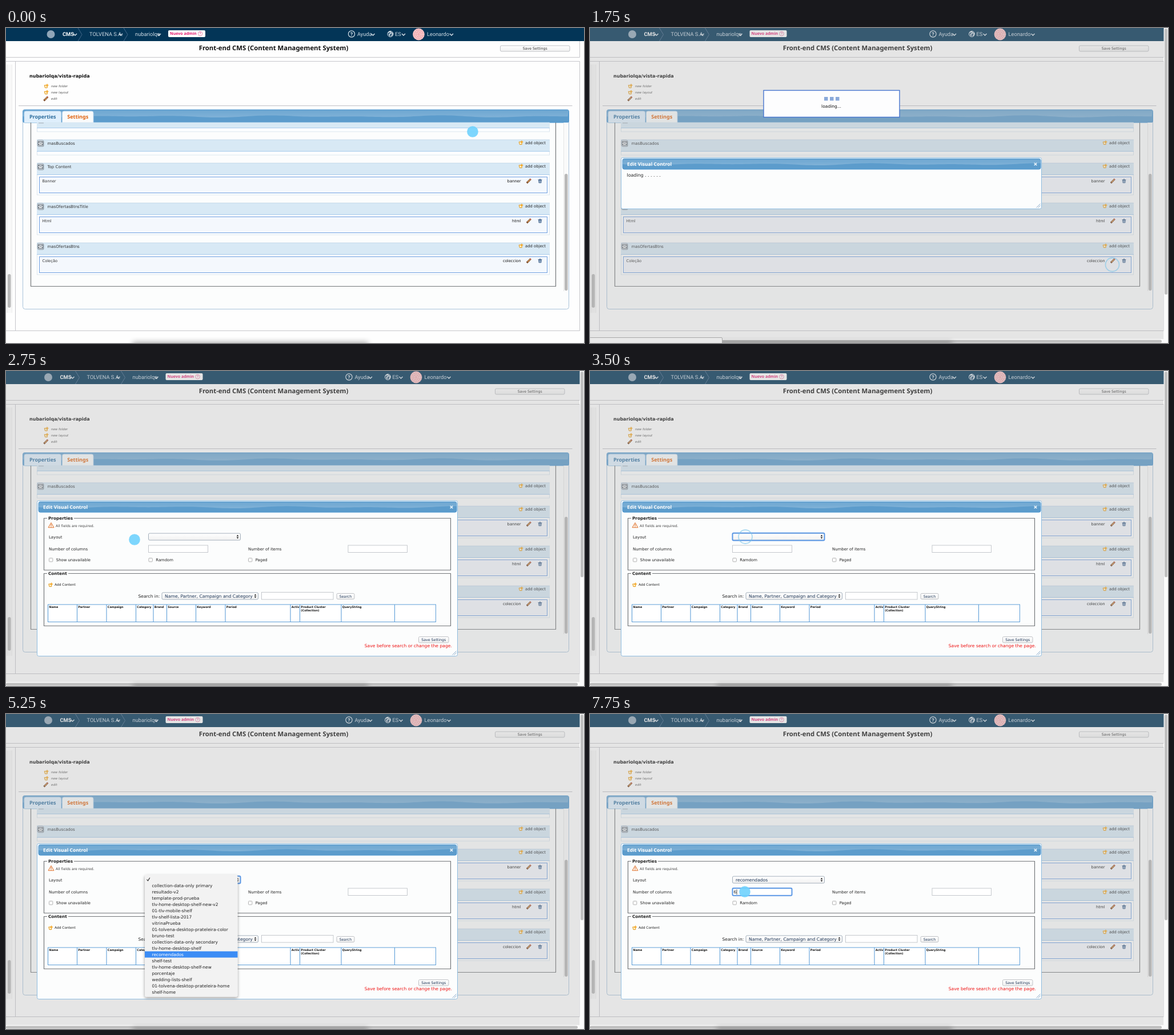
An HTML page for the animation above (8 s loop, 1012 by 553 pixels).

```html
<!DOCTYPE html>
<html lang="es">
<head>
<meta charset="utf-8">
<title>Front-end CMS</title>
<style>
  html, body { margin: 0; width: 100%; height: 100%; overflow: hidden; background: #fefefe; }
  svg { display: block; width: 1012px; height: 553px; font-family: 'DejaVu Sans', Verdana, sans-serif; text-rendering: geometricPrecision; }
  text { white-space: pre; }
  .ui { font-family: 'Noto Sans', sans-serif; font-weight: 700; }
  .bar { font-family: Roboto, sans-serif; font-stretch: 75%; }
  .b { font-weight: 700; }
  .i { font-style: italic; }
</style>
</head>
<body>
<svg id="stage" viewBox="0 0 1012 553">
  <defs>
    <linearGradient id="gloss" x1="0" y1="0" x2="0" y2="1">
      <stop offset="0" stop-color="#fff" stop-opacity=".1"/>
      <stop offset="1" stop-color="#fff" stop-opacity=".22"/>
    </linearGradient>
    <linearGradient id="btn" x1="0" y1="0" x2="0" y2="1">
      <stop offset="0" stop-color="#fff"/>
      <stop offset="1" stop-color="#f1f1f1"/>
    </linearGradient>
    <filter id="soft" x="-10%" y="-200%" width="120%" height="500%"><feGaussianBlur stdDeviation="5"/></filter>
    <filter id="drop" x="-10%" y="-10%" width="120%" height="120%">
      <feDropShadow dx="0" dy="2" stdDeviation="2.5" flood-opacity=".4"/>
    </filter>
  </defs>
</svg>
<script>
const STEP = 250, STEPS = 32;
const stage = document.getElementById('stage');

function add(parent, tag, attrs = {}, content) {
  const node = document.createElementNS('http://www.w3.org/2000/svg', tag);
  for (const key in attrs) node.setAttribute(key, attrs[key]);
  if (content !== undefined) node.textContent = content;
  parent.append(node);
  return node;
}
const group = (parent, attrs) => add(parent, 'g', attrs);
const rect = (p, x, y, width, height, fill, more) => add(p, 'rect', { x, y, width, height, fill, ...more });
const path = (p, d, stroke, width = 1, fill = 'none') => add(p, 'path', { d, stroke, 'stroke-width': width, fill });
const disc = (p, cx, cy, r, fill, more) => add(p, 'circle', { cx, cy, r, fill, ...more });
const label = (p, x, y, size, str, fill = '#222', more) => add(p, 'text', { x, y, 'font-size': size, fill, ...more }, str);
const middle = { 'text-anchor': 'middle' }, end = { 'text-anchor': 'end' };

// ---- icons, centred on x, y
const at = (p, x, y) => group(p, { transform: `translate(${x} ${y})` });
function newIcon(p, x, y) {
  const g = at(p, x, y);
  path(g, 'M-2.8-1.6H2.2V3H-1.6Z', '#e39a1f', 1, '#fff0c4');
  path(g, 'M2-4V1M-.4-1.5H4.4', '#f5a623', 1.3);
}
function pencil(p, x, y) {
  const g = at(p, x, y);
  path(g, 'M-3.6 3.6L3.2-3.2', '#6b3a1a', 3);
  path(g, 'M-2.4 2.4L2.4-2.4', '#e2a25e', 1.4);
  path(g, 'M2.3-2.3L3.4-3.4', '#c8554a', 2);
}
function trash(p, x, y) {
  const g = at(p, x, y);
  path(g, 'M-2.4-1.2H2.4L2 3.3H-2Z', '#48688f', 1, '#b4c7dd');
  path(g, 'M-3.4-2H3.4M-1-3.2H1M0-.6V2.6', '#48688f');
}
function envelope(p, x, y) {
  const g = at(p, x, y);
  rect(g, -5, -5, 11, 11, '#9aa5ae', { rx: 2 });
  rect(g, -5.5, -5.5, 10.5, 10.5, '#d9dfe4', { rx: 2, stroke: '#8996a1', 'stroke-width': .8 });
  path(g, 'M-4-3H3.8V3H-4ZL0 .6L3.8-3M-4 3L-1.2 0M3.8 3L1.2 0', '#4a5560', .8, '#fff');
}
const chevron = (p, x, y) => path(p, `M${x} ${y - 1.5}l3 3l3-3`, '#d5e0e8', 1.5);

// ---- glossy blue strip with a wavy highlight
function strip(p, x, y, w, h) {
  rect(p, x, y, w, h, '#5c9ccc', { rx: 3, stroke: '#4f97d0' });
  let d = `M${x} ${y}`;
  for (let i = 0; i <= w; i += 6) d += `L${x + i} ${y + h * .52 + 2 * Math.sin(i / 31) * Math.cos(i / 120)}`;
  path(p, `${d}L${x + w} ${y}Z`, 'none', 0, 'url(#gloss)');
}
const button = (p, x, y, w, h, str, fill) => {
  rect(p, x, y, w, h, 'url(#btn)', { rx: 2, stroke: '#b9bcc0', 'stroke-width': .9 });
  label(p, x + w / 2, y + h / 2 + 2.3, 6.25, str, fill, middle);
};

// ---- page
const page = group(stage);
rect(page, 0, 0, 1012, 553, '#fefefe');
rect(page, 0, 64, 10, 436, '#f8f8f8');
path(page, 'M10.5 64V500M2.5 64V500', '#eee');
rect(page, 3, 432, 5.5, 59, '#b9b9b9', { rx: 2.7 });
path(page, 'M0 51.5H1004.5V23M0 58.5H1004.5V531.5H0M16.5 58V531', '#c6c6cb');
path(page, 'M22 136.5H991.5', '#bfbfc4');
label(page, 468.5, 39, 11.33, 'Front-end CMS (Content Management System)', '#111', { class: 'ui', ...middle });
const save = group(page);
button(save, 865.5, 31, 121.5, 10, 'Save Settings', '#333');

rect(page, 0, 0, 1012, 23, '#033557');
const head = group(page, { class: 'bar' });
disc(head, 78.5, 11, 7, '#90a6b8');
path(head, 'M126 0L133 11.5L126 23M206 0L213 11.5L206 23', '#43688a', 1);
const menu = [
  [99, 'CMS', 118, '#fff'], [146, 'TOLVENA S.A.', 198], [226, 'nubariolqa', 265],
  [615, 'Ayuda', 639.5], [681, 'ES', 693], [737, 'Leonardo', 777]
];
for (const [x, str, arrow, fill = '#cddae4'] of menu) {
  label(head, x, 14, 9.3, str, fill, str === 'CMS' ? { class: 'b' } : {});
  chevron(head, arrow, 11.5);
}
rect(head, 284, 4, 65, 12, '#fff', { rx: 2 });
label(head, 287, 12.4, 7, 'Nuevo admin', '#e3176c', { class: 'ui' });
disc(head, 340, 10, 3.8, 'none', { stroke: '#e87aa6', 'stroke-width': .9 });
label(head, 340, 12.4, 6.2, '?', '#e3176c', middle);
disc(head, 605, 10.5, 5.6, 'none', { stroke: '#d5e0e8', 'stroke-width': 1.2 });
label(head, 605, 13.8, 9, '?', '#d5e0e8', { class: 'b', ...middle });
disc(head, 673, 10.5, 5, '#27506f', { stroke: '#d5e0e8', 'stroke-width': 1 });
path(head, 'M669 8l4-2l1 3l-3 2l1 3M675 8l2 2l-2 4', '#d5e0e8', 1.6);
disc(head, 722.5, 11, 10.4, '#f3b0b5');
for (const r of [3, 6, 9]) disc(head, 722.5, 11, r, 'none', { stroke: '#fbe3e4', 'stroke-width': 1.2, 'stroke-dasharray': '1.6 1.6' });

label(page, 41, 87, 8, 'nubariolqa/vista-rapida', '#111', { class: 'b' });
['new folder', 'new layout', 'edit'].forEach((str, i) => {
  const y = 102 + i * 11;
  (i < 2 ? newIcon : pencil)(page, 70, y);
  label(page, 79, y + 2.3, 5.5, str, '#555', { class: 'i' });
});

// ---- tabs
rect(page, 29.5, 143.5, 956, 350, '#fcfdfd', { rx: 4, stroke: '#a9c3da' });
strip(page, 29.5, 143.5, 956, 22.5);
const tab = (x, w, str, fill, color) => {
  path(page, `M${x} 166V149q0-3 3-3h${w - 6}q3 0 3 3V166`, '#b9d6ee', 1, fill);
  label(page, x + w / 2, 159.4, 9, str, color, { class: 'ui', ...middle });
};
tab(32, 64.5, 'Properties', '#dfeffc', '#2e6e9e');
tab(98.5, 54.5, 'Settings', '#f9fbfc', '#e0610c');
path(page, 'M43.5 166V453.5H962.5V166', '#73777a', 1.2);
rect(page, 977, 166, 8, 296, '#fafafa');
path(page, 'M976.5 166V462', '#e6e6e6');
rect(page, 978, 256, 5.5, 205, '#b9b9b9', { rx: 2.7 });

// ---- content blocks
const edge = { stroke: '#d3e0ea', 'stroke-width': .8 };
rect(page, 54.5, 166, 897, 16, '#fdfeff', edge);
rect(page, 54.5, 166, 897, 9, '#d8e9f5');
path(page, 'M54 175.5H952', '#a9ccec');
rect(page, 57, 166, 9, 1.5, '#b3bfc9');
function block(y, name, item, tag) {
  const h = item ? 56 : 27;
  rect(page, 54.5, y, 897, h, '#fdfeff', edge);
  rect(page, 54, y, 898, 20, '#d8e9f5');
  path(page, `M54 ${y + 20.5}H952`, '#a9ccec');
  path(page, `M54 ${y + .5}H952`, '#c7dced', .8);
  envelope(page, 60.5, y + 6.5);
  label(page, 72.5, y + 8.5, 7, name, '#333');
  newIcon(page, 901, y + 5.5);
  label(page, 945, y + 7.5, 6.8, 'add object', '#222', end);
  if (!item) return;
  rect(page, 58.5, y + 24.5, 889, 28, '#f4f8fd', { stroke: '#6f9fe0' });
  label(page, 63.5, y + 34, 6.7, item, '#333');
  label(page, 901.5, y + 34, 6.75, tag, '#111', end);
  pencil(page, 915.5, y + 31.5);
  trash(page, 935, y + 31.5);
}
block(196, 'masBuscados');
block(237, 'Top Content', 'Banner', 'banner');
block(307, 'masOfertasBtnsTitle', 'Html', 'html');
block(377, 'masOfertasBtns', 'Coleção', 'coleccion');

// ---- modal layer
const modal = group(stage);
rect(modal, 0, 0, 1004.5, 546, '#aaa', { opacity: .31 });
rect(modal, 1004.5, 0, 7.5, 553, '#fbfbfb');
rect(modal, 0, 546, 1012, 7, '#fbfbfb');
const thumb = rect(modal, 1006, 1, 5, 361, '#bfbfbf', { rx: 2.5 });
rect(modal, 0, 547.5, 1001, 5, '#bfbfbf', { rx: 2.5 });

const dialog = rect(modal, 54.5, 227.5, 736, 273, '#fcfdfd', { rx: 3, stroke: '#8fbde0' });
strip(modal, 57, 229.5, 732, 18.5);
label(modal, 65, 242.2, 8.5, 'Edit Visual Control', '#fff', { class: 'ui' });
path(modal, 'M777.7 236.7l4.6 4.6m0-4.6l-4.6 4.6', '#eaf3fa', 1.6);
const grip = group(modal);
path(grip, 'M781.5 315.5l7-7M784.5 315.5l4-4', '#7fa3c4', .9);

const loading = group(modal);
label(loading, 64.5, 260.5, 7.9, 'loading . . . . . .');
rect(loading, 304, 109.5, 238, 47, '#fdfdfe', { stroke: '#4876cf', 'stroke-width': 1.4 });
for (const x of [410, 420, 430]) rect(loading, x, 121, 6.5, 6.5, '#8aa9da');
label(loading, 422.5, 140.3, 7.5, 'loading...', '#111', middle);

// ---- form
const form = group(modal);
function fieldset(y, h, title, gap) {
  path(form, `M72 ${y}H66.5V${y + h}H778.5V${y}H${gap}`, '#74777a', 1.2);
  label(form, 74, y + 2.7, 7.3, title, '#222', { class: 'b' });
}
const field = (x, y, w) => rect(form, x, y, w, 12.5, '#fff', { stroke: '#bfc3c8', 'stroke-width': .9 });
function select(x, y, w) {
  rect(form, x, y, w, 12, 'url(#btn)', { rx: 2, stroke: '#9aa7b5', 'stroke-width': .9 });
  const a = x + w - 5;
  path(form, `M${a - 1.8} ${y + 5.2}l1.8-2.6l1.8 2.6ZM${a - 1.8} ${y + 6.8}l1.8 2.6l1.8-2.6Z`, 'none', 0, '#222');
}
const focusRing = (x, y, w) => rect(form, x, y, w, 13, 'none', { rx: 2, stroke: '#5b98e6', 'stroke-width': 2 });

fieldset(258.5, 91, 'Properties', 119);
path(form, 'M79 266.3L84 274.8H74Z', '#e0702a', 1, '#fdf3e6');
path(form, 'M79 269V272M79 273V274', '#d2571a', .9);
label(form, 87, 274, 6.15, 'All fields are required.', '#444');
label(form, 75, 293.5, 6.9, 'Layout');
select(249.5, 285, 161);
label(form, 75, 314.7, 6.95, 'Number of columns');
label(form, 424, 314.7, 6.95, 'Number of items');
field(249.5, 306, 104);
field(599, 306, 103.5);
for (const [x, str] of [[75.5, 'Show unavailable'], [250, 'Ramdom'], [424.5, 'Paged']]) {
  rect(form, x, 328.5, 6.3, 6.3, '#fff', { rx: 1, stroke: '#a9a9a9', 'stroke-width': .9 });
  label(form, x + 12.3, 334.3, 6.85, str);
}
fieldset(355.5, 92, 'Content', 109);
newIcon(form, 77.5, 375.5);
label(form, 85, 377.3, 5.9, 'Add Content');
label(form, 231.5, 397.7, 7.55, 'Search in:');
select(273, 389, 168.5);
label(form, 278, 397.8, 7.7, 'Name, Partner, Campaign and Category', '#1c3557');
field(447.5, 388.5, 125.5);
button(form, 579, 390.5, 31, 10, 'Search', '#1c3557');

const columns = [
  [73.5, 'Name'], [124.5, 'Partner'], [176, 'Campaign'], [227.5, 'Category'], [258, 'Brand'], [281.5, 'Source'],
  [332.5, 'Keyword'], [384, 'Period'], [498, 'Activ'], [514.5, 'Product Cluster'], [587, 'QueryString'], [680.5, '']
];
rect(form, 73.5, 410, 679, 30.5, '#fff', { stroke: '#5f9fd8' });
for (const [x, str] of columns) {
  path(form, `M${x} 410V440.5`, '#5f9fd8', 1.1);
  label(form, x + 1.8, 415.8, 4.95, str, '#111', { class: 'b' });
}
label(form, 516.3, 422.3, 4.95, '(Collection)', '#111', { class: 'b' });
button(form, 722.5, 466.5, 52.5, 10.5, 'Save Settings', '#1c3557');
label(form, 781, 485.3, 7.65, 'Save before search or change the page.', '#ee1111', end);

const selectFocus = focusRing(249.5, 284.5, 161);
const inputFocus = focusRing(249.5, 305.7, 104);
const chosen = label(form, 255, 293.7, 7.6, 'recomendados', '#1c3557');
const typed = label(form, 251.5, 315, 7.4, '6');
const caret = path(form, 'M257 308V317', '#222', .8);

// ---- drop-down list
const list = group(stage);
rect(list, 243, 282.5, 162.5, 214, '#f2f2f2', { rx: 3, filter: 'url(#drop)' });
const mark = rect(list, 243, 0, 162.5, 11, '#3b8cf5');
const tick = path(list, 'M246.5 290.5l2 2.3l3.3-5.3', '#222', 1.1);
const options = [
  '', 'collection-data-only primary', 'resultado-v2', 'template-prod-prueba', 'tlv-home-desktop-shelf-new-v2',
  '01-tlv-mobile-shelf', 'tlv-shelf-lista-2017', 'vitrinaPrueba', '01-tolvena-desktop-prateleira-color',
  'bruno-test', 'collection-data-only secondary', 'tlv-home-desktop-shelf', 'recomendados', 'shelf-test',
  'tlv-home-desktop-shelf-new', 'porcentaje', 'wedding-lists-shelf', '01-tolvena-desktop-prateleira-home', 'shelf-home'
];
const rowY = i => 290.2 + i * 11;
const rows = options.map((str, i) => label(list, 255.5, rowY(i) + 2.7, 7.5, str));

// ---- screen furniture and pointer
rect(stage, 222, 551, 412, 14, '#000', { opacity: .3, filter: 'url(#soft)' });
const status = group(stage);
rect(status, -1, 543.5, 232.5, 11, '#e9e9e9', { rx: 1.5, stroke: '#a8a8a8' });
const pointer = disc(stage, 0, 0, 9.8, '#6fd2fd', { opacity: .9 });
const ring = disc(stage, 0, 0, 12, 'none', { stroke: '#7cc4ea', 'stroke-width': 1.8, opacity: .6 });

// from step, to step, x0, y0, x1, y1
const moves = [
  [0, 5, 817, 182, 915.5, 415.5], [8, 11, 914, 415, 225, 296], [11, 13, 225, 296, 272, 291],
  [25, 27, 272, 358, 271, 312], [30, 31, 271, 312, 271, 312]
];
// from step, to step, x, y
const clicks = [[6, 7, 914.5, 415.5], [14, 14, 272, 291], [23, 24, 272.5, 358], [28, 29, 271, 312]];
const hovered = [0, 4, 9, 12, 13, 13, 12, 12], LIST_OPEN = 15;

const show = (node, on) => node.setAttribute('display', on ? 'inline' : 'none');
const place = (node, x, y) => { node.setAttribute('cx', x); node.setAttribute('cy', y); };
const ease = k => k * k * (3 - 2 * k);
const during = s => ([from, to]) => s >= from && s <= to;

function draw(s) {
  const open = s >= 7, ready = s >= 11;
  show(modal, open);
  show(loading, !ready);
  show(form, ready);
  show(status, s >= 6 && s <= 9);
  head.setAttribute('transform', `translate(${open ? -4.5 : 0} 0)`);
  save.setAttribute('transform', `translate(${open ? -9 : 0} 0)`);
  dialog.setAttribute('height', ready ? 273 : 90);
  grip.setAttribute('transform', `translate(0 ${ready ? 183 : 0})`);
  thumb.setAttribute('height', ready ? 361 : 467);

  show(selectFocus, s >= 14 && s < 28);
  show(chosen, s >= 25);
  show(inputFocus, s >= 28);
  show(typed, s >= 30);
  show(caret, s >= 30);

  const row = hovered[s - LIST_OPEN];
  show(list, row !== undefined);
  if (row !== undefined) {
    mark.setAttribute('y', rowY(row) - 5.6);
    rows.forEach((node, i) => node.setAttribute('fill', i === row ? '#fff' : '#222'));
    tick.setAttribute('stroke', row ? '#222' : '#fff');
  }

  const move = moves.find(during(s)), click = clicks.find(during(s));
  show(pointer, move);
  show(ring, click);
  if (move) {
    const [from, to, x0, y0, x1, y1] = move, k = ease((s - from) / (to - from));
    place(pointer, x0 + (x1 - x0) * k, y0 + (y1 - y0) * k);
  }
  if (click) place(ring, click[2], click[3]);
}

let last = -1;
const start = performance.now();
function tickFrame() {
  const s = Math.floor((performance.now() - start) / STEP) % STEPS;
  if (s !== last) draw(last = s);
  requestAnimationFrame(tickFrame);
}
tickFrame();
</script>
</body>
</html>
```
